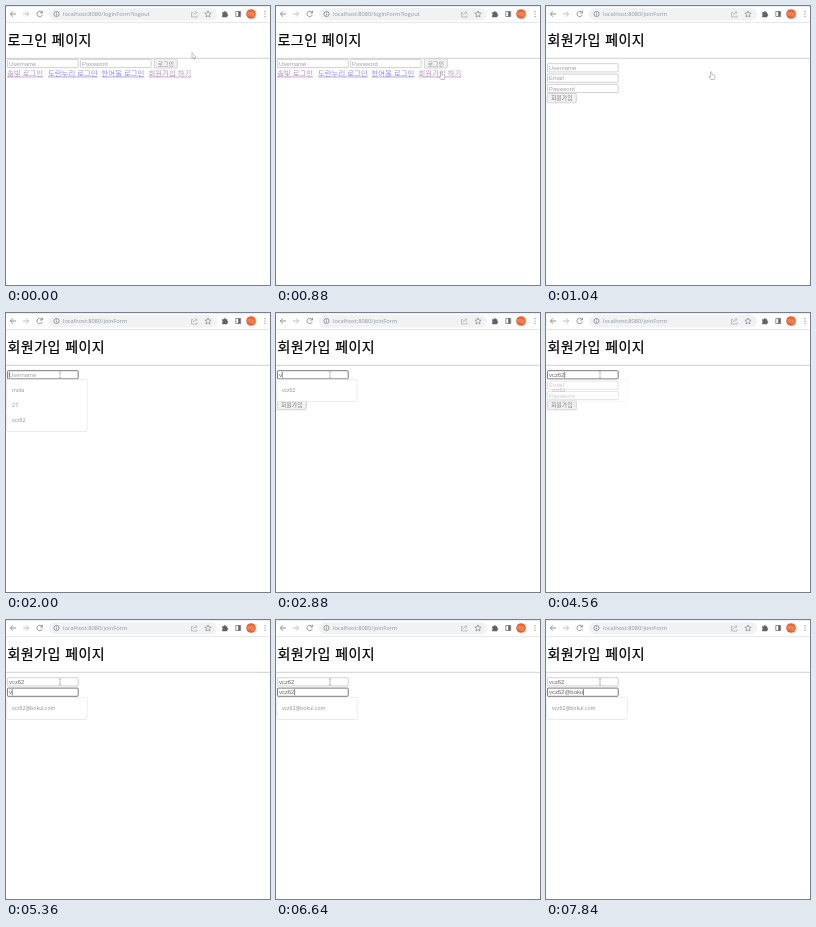
Write an HTML page that moves like this. It is 264x279 px and loops after 8000 ms.

```html
<!DOCTYPE html>
<html lang="ko">
<head>
<meta charset="utf-8">
<title>회원가입</title>
<style>
html, body { margin: 0; width: 264px; height: 279px; overflow: hidden; background: #fff; }
svg { display: block; }
text { font-family: "Noto Sans CJK KR", "Noto Sans CJK", "Noto Sans CJK JP", sans-serif; white-space: pre; }
.head { font-size: 14px; letter-spacing: .45px; stroke: #000; stroke-width: .25; }
.link { font-size: 7.4px; text-decoration: underline; fill: #8f8df0; }
.seen { fill: #b391c6; }
.label { font-size: 5.9px; fill: #858585; text-anchor: middle; }
.field text { font: 5.9px "Liberation Sans", Arial, sans-serif; }
.field rect { fill: #fff; stroke: #bdbdbd; stroke-width: .7; }
.field.on rect { stroke: #6a6a6a; stroke-width: .9; }
.url, .menu text { font: 5.7px "Open Sans", "Noto Sans", sans-serif; fill: #8f959c; }
.menu text { font-size: 5.2px; fill: #8a8a8a; }
.menu rect { fill: #fff; stroke: #e6e6e6; stroke-width: .4; filter: drop-shadow(0 .7px .7px #0003); }
.icon { fill: none; stroke: #74787c; stroke-width: .8; }
.pale { stroke: #a5a8ab; stroke-width: .7; }
.pointer { fill: #fff; stroke: #999; stroke-width: .6; }
</style>
</head>
<body>
<svg width="264" height="279" viewBox="0 0 264 279">
  <g id="bar">
    <rect x="43" y="2" width="168" height="12.5" rx="6.2" fill="#f0f2f4"/>
    <path d="M0 .3H264" stroke="#d5d8dc" stroke-width=".6"/>
    <path d="M0 16.5H264" stroke="#e2e2e2" stroke-width=".8"/>
    <g class="icon">
      <path d="M10 8H4.5M7 5.3L4.3 8L7 10.7"/>
      <path class="pale" d="M17 8H22.5M20 5.3L22.7 8L20 10.7"/>
      <path d="M35.8 6.2A2.7 2.7 0 1 0 36.3 8.8M36.4 4.8V7H34.2"/>
      <circle cx="50.5" cy="8" r="2.6" stroke-width=".7"/>
      <path d="M50.5 7.6V9.5M50.5 6.3V7" stroke-width=".7"/>
      <path class="pale" d="M187 6.5H185.5V11H191V9.5M187.2 9Q187.5 6.5 190.8 6.5M189.3 4.8L191 6.5L189.3 8.2"/>
      <path d="M202 4.9L202.9 7L205.2 7.2L203.5 8.7L204 11L202 9.8L200 11L200.5 8.7L198.8 7.2L201.1 7Z" stroke-width=".6"/>
      <path d="M216.3 6.4H217.8A1 1 0 0 1 219.8 6.4H221V8A1 1 0 0 1 221 10V11H216.3V9.6A1 1 0 0 0 216.3 7.8Z" fill="#5f6368" stroke="#5f6368" stroke-width=".5"/>
      <path d="M229.8 5.5H234.7V10.5H229.8Z"/>
      <path d="M233.3 5.5V10.5" stroke="#5f6368" stroke-width="2.2"/>
    </g>
    <circle cx="245" cy="8" r="4.8" fill="#f0602c"/>
    <text x="245" y="9.5" font-size="4" fill="#fbd5c6" text-anchor="middle">하늘</text>
    <g fill="#74787c">
      <circle cx="259" cy="5.7" r=".6"/><circle cx="259" cy="8" r=".6"/><circle cx="259" cy="10.3" r=".6"/>
    </g>
    <text class="url" id="url" x="57" y="10"></text>
  </g>
  <path d="M0 52.3H264" stroke="#c4c4c4" stroke-width=".8"/>
  <g id="login">
    <text class="head" x="1.5" y="39.3">로그인 페이지</text>
    <text class="link seen" x="1" y="69.6">솔빛 로그인</text>
    <text class="link" x="42" y="69.6">도란누리 로그인</text>
    <text class="link" x="95.5" y="69.6">한여울 로그인</text>
    <text class="link seen" x="142.5" y="69.6">회원가입 하기</text>
  </g>
  <g id="join">
    <text class="head" x="1.5" y="39.3">회원가입 페이지</text>
  </g>
  <g id="menus"></g>
  <g class="pointer">
    <path id="arrow" d="M0 0V6L1.4 4.8L2.3 6.8L3.2 6.4L2.3 4.5H4.2Z"/>
    <path id="hand" d="M-1 0Q-.2 -.8 .4 0V2.6L3 3.2Q3.6 3.5 3.5 4.4L2.8 7.5H-.6L-2.8 4.6Q-2.6 3.8 -1 4.8Z"/>
    <path id="beam" fill="none" d="M-1.3 -3.2Q0 -3.2 0 -2.4Q0 -3.2 1.3 -3.2M0 -2.4V2.4M-1.3 3.2Q0 3.2 0 2.4Q0 3.2 1.3 3.2"/>
  </g>
</svg>
<script>
const $ = id => document.getElementById(id);
const show = (el, on) => el.style.display = on ? '' : 'none';

function add(parent, tag, attrs, text = '') {
  const el = document.createElementNS('http://www.w3.org/2000/svg', tag);
  for (const k in attrs) el.setAttribute(k, attrs[k]);
  el.textContent = text;
  parent.append(el);
  return el;
}

function field(parent, x, y, hint) {
  const box = add(parent, 'g', { class: 'field' });
  add(box, 'rect', { x: x + .4, y: y + .4, width: 70.8, height: 8.2, rx: .8 });
  const text = add(box, 'text', { x: x + 2, y: y + 6.5 });
  const caret = add(box, 'path', { stroke: '#333', 'stroke-width': .6 });
  return (value = '', focus = false, caretOn = false) => {
    box.classList.toggle('on', focus);
    text.textContent = value || hint;
    text.style.fill = value ? '#666' : '#a0a0a0';
    show(caret, caretOn);
    const end = x + 2.3 + (value ? text.getComputedTextLength() : 0);
    caret.setAttribute('d', `M${end} ${y + 1.4}v6.2`);
  };
}

function button(parent, x, y, w, label) {
  add(parent, 'rect', { x, y, width: w, height: 9.4, rx: 1, fill: '#f1f1f1', stroke: '#c4c4c4', 'stroke-width': .7 });
  add(parent, 'text', { x: x + w / 2, y: y + 6.8, class: 'label' }, label);
}

function menu(y, items) {
  const g = add($('menus'), 'g', { class: 'menu' });
  add(g, 'rect', { x: 1, y, width: 80, height: 7 + items.length * 15, rx: 1 });
  items.forEach((s, i) => add(g, 'text', { x: 6, y: y + 12.8 + i * 15 }, s));
  return alpha => g.style.opacity = alpha;
}

const user = 'vcz62', mail = user + '@bokul.com';
field($('login'), 1, 53, 'Username')();
field($('login'), 74, 53, 'Password')();
button($('login'), 148.3, 52.7, 23, '로그인');

const nameField = field($('join'), 1, 57.3, 'Username');
const mailField = field($('join'), 1, 67.7, 'Email');
field($('join'), 1, 78, 'Password')();
button($('join'), 1.3, 87.4, 29, '회원가입');

const allMenu = menu(66.5, ['mola', '27', user]);
const nameMenu = menu(66.5, [user]);
const mailMenu = menu(77.3, [mail]);

// The first time is the focus, each later one a key press.
const nameKeys = [1920, 2880, 3040, 3200, 4160, 4320];
const mailKeys = [4880, 5280, 5440, 5600, 6320, 6640, 7200, 7520, 7680, 7760, 7840];

const ramp = (t, a, b) => Math.min(1, Math.max(0, (t - a) / (b - a)));
const ease = p => p * p * (3 - 2 * p);
const mix = (a, b, p) => a + (b - a) * p;

function type(draw, keys, value, t, until) {
  const done = keys.filter(k => k <= t);
  const focus = done.length > 0 && t < until;
  const blink = Math.floor((t - done[done.length - 1]) / 500) % 2 === 0;
  draw(value.slice(0, Math.max(0, done.length - 1)), focus, focus && blink);
}

function pointer(t) {
  const p = ease(ramp(t, 0, 480)), q = ease(ramp(t, 1280, 1760));
  const x = mix(mix(186, 165.5, p), 54, q), y = mix(mix(46.7, 66, p), 62, q);
  const kind = t >= 1680 ? 'beam' : t >= 400 && t < 1120 ? 'hand' : 'arrow';
  for (const id of ['arrow', 'hand', 'beam']) {
    show($(id), id === kind);
    $(id).setAttribute('transform', `translate(${x} ${y})`);
  }
}

function frame() {
  const t = Math.floor(performance.now() % 8000 / 80) * 80;
  const joined = t >= 960;
  show($('login'), !joined);
  show($('join'), joined);
  $('url').textContent = 'localhost:8080/' + (joined ? 'joinForm' : 'loginForm?logout');
  type(nameField, nameKeys, user, t, mailKeys[0]);
  type(mailField, mailKeys, mail, t, 8000);
  allMenu(t < 2880 ? ramp(t, 1840, 2000) : 0);
  nameMenu(t < 2880 ? 0 : 1 - ramp(t, 4400, 4680));
  mailMenu(ramp(t, 5200, 5360));
  pointer(t);
  requestAnimationFrame(frame);
}
frame();
</script>
</body>
</html>
```
